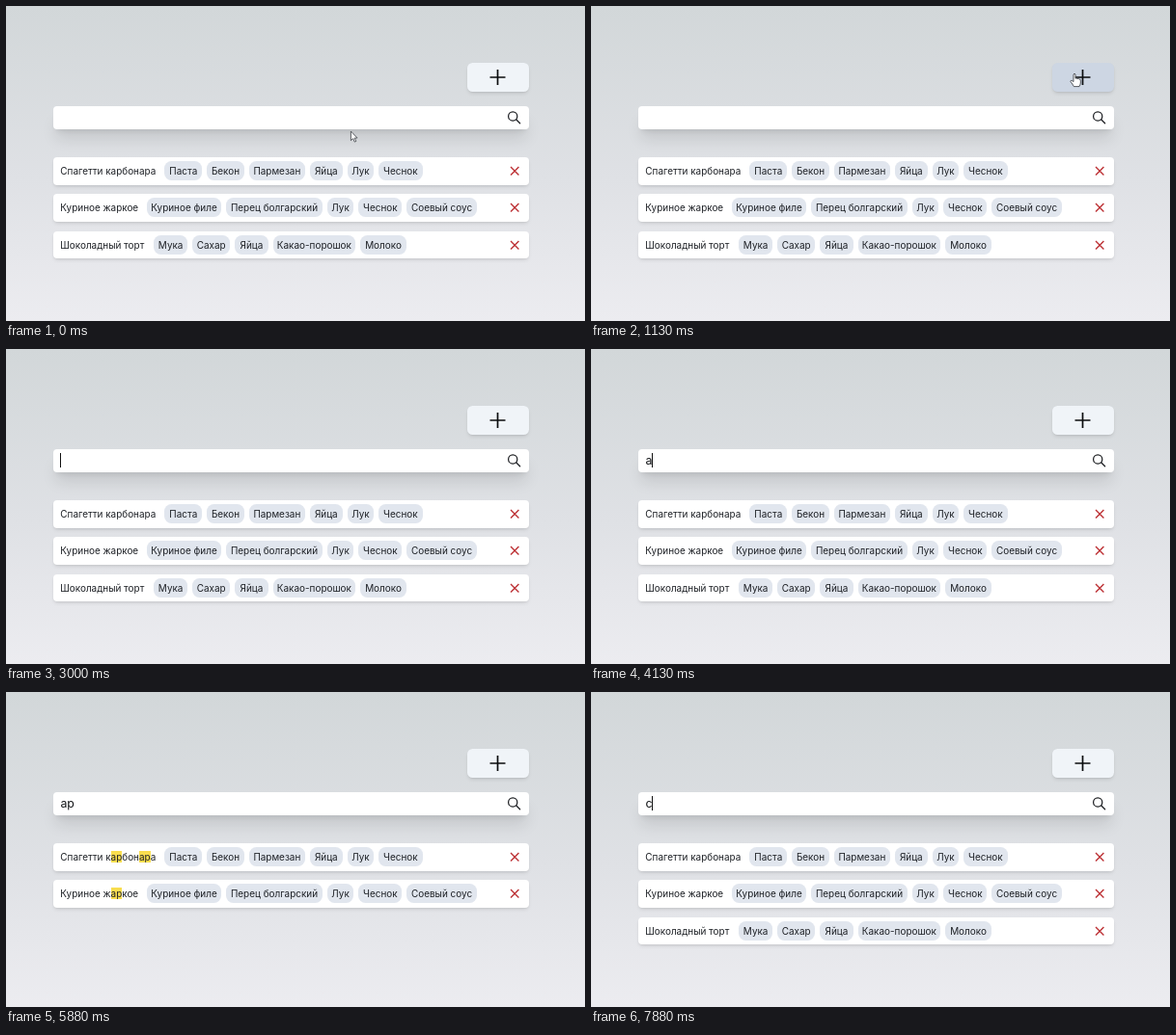
An HTML page for the animation above (8000 ms loop, 600 by 327 pixels).

```html
<!DOCTYPE html>
<html lang="ru">
<head>
<meta charset="utf-8">
<title>Рецепты</title>
<style>
html, body { margin: 0; width: 100%; height: 100%; overflow: hidden; }
body { background: #e0e2e6; }
#stage {
  position: relative; width: 600px; height: 327px; overflow: hidden;
  background: linear-gradient(#d2d7d9, #dfe1e5 55%, #ececf0);
  font: 400 9.95px/20px Inter, "Open Sans", sans-serif; color: #1e2126;
}
#stage div, #stage svg { position: absolute; box-sizing: border-box; white-space: nowrap; }
svg { left: 0; top: 0; overflow: visible; fill: none; }
#add {
  left: 477.5px; top: 59px; width: 64px; height: 30px; border-radius: 5.5px;
  background: #f0f4f8; box-shadow: 0 2.5px 4px -1px #0000001c, 0 1.2px 2.5px -1px #0000001c;
}
#add.hover { background: #cdd6e3; }
#bar {
  left: 48.5px; top: 103.5px; width: 493px; height: 24.5px; border-radius: 4px; background: #fff;
  box-shadow: 0 13px 16px -3px #0000001a, 0 5px 6px -4px #0000001f;
}
#query { left: 56.4px; top: 105.8px; font-size: 12.4px; color: #15171a; }
#caret { right: -1px; top: 2.5px; width: 1px; height: 15px; background: #111; }
.row {
  left: 48.5px; width: 493px; height: 28.3px; border-radius: 4px; background: #fff;
  box-shadow: 0 2.5px 4px -1px #0000001a, 0 1.2px 2.5px -1px #0000001a;
}
.name { left: 7.8px; top: 4px; }
.chip { top: 4px; height: 20px; border-radius: 7.5px; background: #e1e6ee; display: flex; justify-content: center; }
.lit mark { background: #f9de4f; }
mark { background: none; color: inherit; }
</style>
</head>
<body>
<div id="stage">
  <div id="add"></div>
  <div id="bar"></div>
  <div id="query"><span id="text"></span><div id="caret"></div></div>
  <svg width="600" height="327">
    <path d="M501.5 74h16M509.5 66v16" stroke="#0b0c0e" stroke-width="1.7"/>
    <g stroke="#1c1e22" stroke-width="1.25" stroke-linecap="round">
      <circle cx="525.2" cy="114.4" r="4.6"/><path d="M528.6 117.8l4 4"/>
    </g>
  </svg>
  <div id="rows"></div>
  <svg id="mouse" width="20" height="20">
    <g id="arrow"><path d="M.4 0v9.6l2.3-2 1.6 3.5 1.5-.7-1.6-3.4h2.9z" fill="#fff" stroke="#3c3f44" stroke-width=".8"/></g>
    <g id="hand"><path d="M-1 1Q0-1 1 1V5.2Q2.2 4.3 3 5.6 4.2 4.8 4.8 6.1 6.3 5.6 6.3 7.3V10Q6 12 5 13.6H-.6Q-2 11-4 8.5-4.2 7-2.5 7.4L-1 8.6z" fill="#fff" stroke="#33363b" stroke-width=".8"/></g>
    <g id="beam"><path d="M-2-5.5Q0-5.5 0-4.5 0-5.5 2-5.5M0-4.5V4.5M-2 5.5Q0 5.5 0 4.5 0 5.5 2 5.5" stroke="#333" stroke-width=".8"/></g>
  </svg>
</div>
<script>
const $ = id => document.getElementById(id);
const LOOP = 8000, STEP = 125;

// Each chip: label, left, right
const recipes = [
  ["Спагетти карбонара", 157.3, [["Паста", 164.3, 203.3], ["Бекон", 208, 247], ["Пармезан", 251.7, 310],
    ["Яйца", 315, 348.6], ["Лук", 353.5, 381.3], ["Чеснок", 386, 431.6]]],
  ["Куриное жаркое", 195.4, [["Куриное филе", 145.8, 223.2], ["Перец болгарский", 228, 328],
    ["Лук", 332.7, 360.5], ["Чеснок", 365.2, 410.4], ["Соевый соус", 415, 488]]],
  ["Шоколадный торт", 233.6, [["Мука", 153, 188.3], ["Сахар", 193, 232.4], ["Яйца", 237.2, 271.7],
    ["Какао-порошок", 276.6, 362.2], ["Молоко", 367, 415]]]
];

const cross = '<svg width="1" height="1"><path d="M474 10l8.4 8.4m0-8.4l-8.4 8.4" stroke="#bd3236" stroke-width="1.4"/></svg>';
const rows = recipes.map(([name, top, chips]) => {
  const row = document.createElement("div");
  row.className = "row";
  row.style.top = top + "px";
  row.innerHTML = `<div class="name">${name.replace(/ар/g, "<mark>ар</mark>")}</div>` +
    chips.map(([label, l, r]) =>
      `<div class="chip" style="left:${(l - 48.5).toFixed(1)}px;width:${(r - l).toFixed(1)}px">${label}</div>`).join("") + cross;
  $("rows").append(row);
  return row;
});

// Time, query; each edit restarts the caret blink
const edits = [[0, ""], [4000, "а"], [4250, "ар"], [6875, ""], [7750, "с"]];
const blinks = [[1875, 4000], [4000, 4250], [4250, 6250], [6250, 6875], [7250, 7750], [7750, 8250]];
const filter = [4750, 7375];

// Time, x, y of the pointer
const path = [[0, 357, 130], [500, 357, 130], [625, 370, 131], [750, 402, 132], [875, 456, 129],
  [1000, 496, 86], [1125, 501, 70], [1250, 501, 70], [1375, 486, 84], [1500, 436, 102],
  [1625, 386, 112], [1750, 362, 114], [1875, 360, 114]];

function pointAt(t) {
  const i = path.findIndex(p => p[0] > t);
  if (i < 0) return path[path.length - 1].slice(1);
  const [t0, x0, y0] = path[i - 1], [t1, x1, y1] = path[i];
  const k = (t - t0) / (t1 - t0);
  return [x0 + (x1 - x0) * k, y0 + (y1 - y0) * k];
}

function caretOn(t) {
  const b = blinks.find(([from, to]) => t >= from && t < to);
  if (!b) return false;
  return b[0] === 6250 || (t - b[0]) % 1000 < 500;
}

function draw(time) {
  const t = Math.floor(time % LOOP / STEP) * STEP;
  const show = (el, on) => el.style.display = on ? "" : "none";

  $("text").textContent = edits.filter(e => e[0] <= t).pop()[1];
  show($("caret"), caretOn(t));

  const filtered = t >= filter[0] && t < filter[1];
  rows.forEach(r => r.classList.toggle("lit", filtered));
  show(rows[2], !filtered);

  const [x, y] = pointAt(t);
  const visible = t < 2000;
  const onAdd = visible && x > 477 && x < 542 && y > 59 && y < 89;
  const onBar = x > 48 && x < 542 && y > 103 && y < 128;
  $("add").classList.toggle("hover", onAdd);
  show($("mouse"), visible);
  show($("hand"), onAdd);
  show($("beam"), onBar);
  show($("arrow"), !onAdd && !onBar);
  $("mouse").style.transform = `translate(${x}px,${y}px)`;
}

const start = performance.now();
function tick() {
  draw(performance.now() - start);
  requestAnimationFrame(tick);
}
tick();
</script>
</body>
</html>
```
